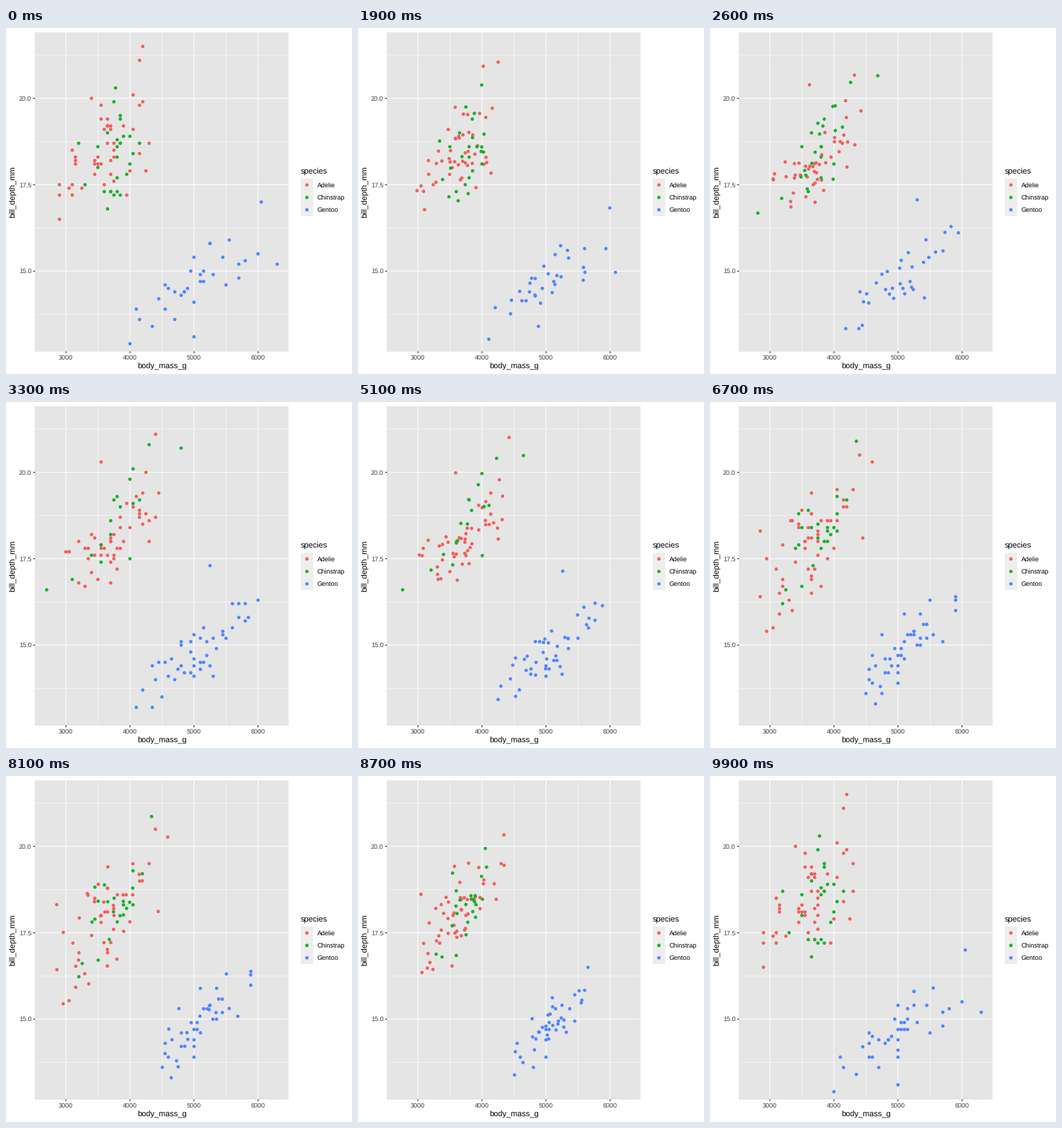
Write a matplotlib script that moves like this. It is 480 px wide and 480 px high and loops after 10000 ms.

```python
import matplotlib.pyplot as plt
import numpy as np
from matplotlib.animation import FuncAnimation
from matplotlib.patches import Rectangle

SIZE, DPI = 480, 72
LEFT, TOP, RIGHT, BOTTOM = 40.4, 5.5, 392.3, 448.5
MASS, DEPTH = (2520, 6480), (12.68, 21.92)
FRAMES, INTERVAL = 100, 100
CYCLE, HOLD, LEAD = 33.6, 11.6, 0.9
DOT = 4.7
GREY, DARK = "#404040", "#272727"

plt.rcParams.update({"font.family": "Liberation Sans", "text.hinting": "none",
                     "text.hinting_factor": 1})
rng = np.random.default_rng(7)

# clouds, one per state: count, mean mass, spread, mean depth, slope per kg, noise
# outliers, one per bird: mass and depth in each state
SPECIES = {
    "Adelie": dict(
        color="#F35E5A",
        clouds=[(49, 3680, 420, 18.6, 1.2, 0.90),
                (50, 3750, 400, 18.2, 1.5, 0.70),
                (52, 3650, 430, 18.1, 1.5, 0.85)],
        outliers=[(4200, 21.5, 4450, 19.4, 3325, 18.6),
                  (3700, 17.3, 4400, 21.1, 4600, 20.3),
                  (4150, 21.1, 3550, 20.3, 3900, 17.5),
                  (3100, 18.5, 3400, 17.1, 3050, 15.5)]),
    "Gentoo": dict(
        color="#5086FF",
        clouds=[(34, 5000, 530, 14.6, 1.0, 0.50),
                (46, 5020, 520, 14.9, 1.5, 0.45),
                (43, 5130, 410, 15.2, 1.7, 0.55)],
        outliers=[(6300, 15.2, 5300, 14.1, 4875, 14.6),
                  (5000, 13.1, 4450, 14.5, 4725, 13.8),
                  (5700, 15.2, 5250, 17.3, 5350, 15.9),
                  (6050, 17.0, 5800, 16.2, 5500, 16.3)]),
    "Chinstrap": dict(
        color="#17B12B",
        clouds=[(26, 3690, 300, 18.4, 0.9, 0.80),
                (18, 3750, 350, 18.3, 1.8, 0.65),
                (24, 3720, 320, 18.3, 2.0, 0.75)],
        outliers=[(3775, 20.3, 4800, 20.7, 3450, 18.8),
                  (3950, 17.8, 4300, 20.8, 3675, 17.3),
                  (3700, 17.3, 2700, 16.6, 3250, 16.6)]),
}


def px(mass):
    return LEFT + (mass - MASS[0]) / (MASS[1] - MASS[0]) * (RIGHT - LEFT)


def py(depth):
    return BOTTOM - (depth - DEPTH[0]) / (DEPTH[1] - DEPTH[0]) * (BOTTOM - TOP)


def cloud(n, mass, spread, depth, slope, noise):
    """Seeded points around a trend line, rounded like scale readings."""
    z = np.clip(rng.normal(size=(n, 2)), -1.9, 1.9)
    dm = z[:, 0] * spread
    d = depth + slope * dm / 1000 + z[:, 1] * noise
    return np.column_stack([np.round((mass + dm) / 50) * 50, np.round(d, 1)])


def build_states():
    """Pixel positions as (state, bird, xy); absent birds are NaN."""
    groups, colors = [], []
    for sp in SPECIES.values():
        size = max(c[0] for c in sp["clouds"])
        group = np.full((3, size, 2), np.nan)
        known = np.array(sp["outliers"], float).reshape(-1, 3, 2)
        for s, params in enumerate(sp["clouds"]):
            group[s, :params[0]] = cloud(*params)
            group[s, :len(known)] = known[:, s]
        groups.append(group)
        colors += [sp["color"]] * size
    birds = np.concatenate(groups, axis=1)
    return np.stack([px(birds[..., 0]), py(birds[..., 1])], axis=-1), np.array(colors)


def ease(t):
    return 4 * t ** 3 if t < 0.5 else 1 - 4 * (1 - t) ** 3


def line(xs, ys, color="white", lw=1.07):
    ax.plot(xs, ys, color=color, lw=lw, solid_capstyle="butt", snap=False)


def text(x, y, s, size, **kw):
    ax.text(x, y, s, fontsize=size, va="baseline", **kw)


def draw_panel():
    ax.add_patch(Rectangle((LEFT, TOP), RIGHT - LEFT, BOTTOM - TOP, fc="#E5E5E5", lw=0))
    across, down = [LEFT, RIGHT], [TOP, BOTTOM]
    for m in range(3500, 6000, 1000):
        line([px(m)] * 2, down, lw=0.53)
    for d in np.arange(13.75, 22, 2.5):
        line(across, [py(d)] * 2, lw=0.53)

    for m in range(3000, 7000, 1000):
        line([px(m)] * 2, down)
        line([px(m)] * 2, [BOTTOM, BOTTOM + 2.75], DARK)
        text(px(m), 459.7, str(m), 8.8, ha="center", color=GREY)
    for d in (15.0, 17.5, 20.0):
        line(across, [py(d)] * 2)
        line([LEFT - 2.75, LEFT], [py(d)] * 2, DARK)
        text(35.4, py(d) + 3.1, f"{d:.1f}", 8.8, ha="right", color=GREY)

    text((LEFT + RIGHT) / 2, 472.5, "body_mass_g", 11, ha="center")
    text(13.4, (TOP + BOTTOM) / 2, "bill_depth_mm", 11, ha="center",
         rotation=90, rotation_mode="anchor")


def draw_legend():
    x, top, key = 408.8, 209.1, 17.28
    text(x, 202.5, "species", 11)
    names = sorted(SPECIES)
    mids = [top + (i + 0.5) * key for i in range(len(names))]
    for name, y in zip(names, mids):
        ax.add_patch(Rectangle((x, y - key / 2), key, key, fc="#EDEDED", lw=0))
        text(431.5, y + 3.1, name, 8.8)
    ax.scatter([x + key / 2] * len(names), mids, s=DOT ** 2, lw=0, zorder=3,
               c=[SPECIES[n]["color"] for n in names])


def positions(i):
    state, step = divmod(i + LEAD, CYCLE)
    here, there = STATES[int(state)], STATES[(int(state) + 1) % 3]
    if step <= HOLD:
        return here
    # Birds without a partner stay put; newcomers wait for the next state.
    there = np.where(np.isnan(there), here, there)
    return here + (there - here) * ease((step - HOLD) / (CYCLE - HOLD))


def update(i):
    xy = positions(i)
    shown = np.isfinite(xy[:, 0])
    dots.set_offsets(xy[shown])
    dots.set_facecolor(COLORS[shown])
    return (dots,)


STATES, COLORS = build_states()

fig = plt.figure(figsize=(SIZE / DPI, SIZE / DPI), dpi=DPI, facecolor="white")
ax = fig.add_axes([0, 0, 1, 1])
ax.set(xlim=(0, SIZE), ylim=(SIZE, 0))
ax.axis("off")
ax.set_autoscale_on(False)

draw_panel()
draw_legend()
dots = ax.scatter([], [], s=DOT ** 2, lw=0, zorder=3)

anim = FuncAnimation(fig, update, frames=FRAMES, interval=INTERVAL,
                     repeat=True, repeat_delay=0, blit=False)
plt.show()
```
